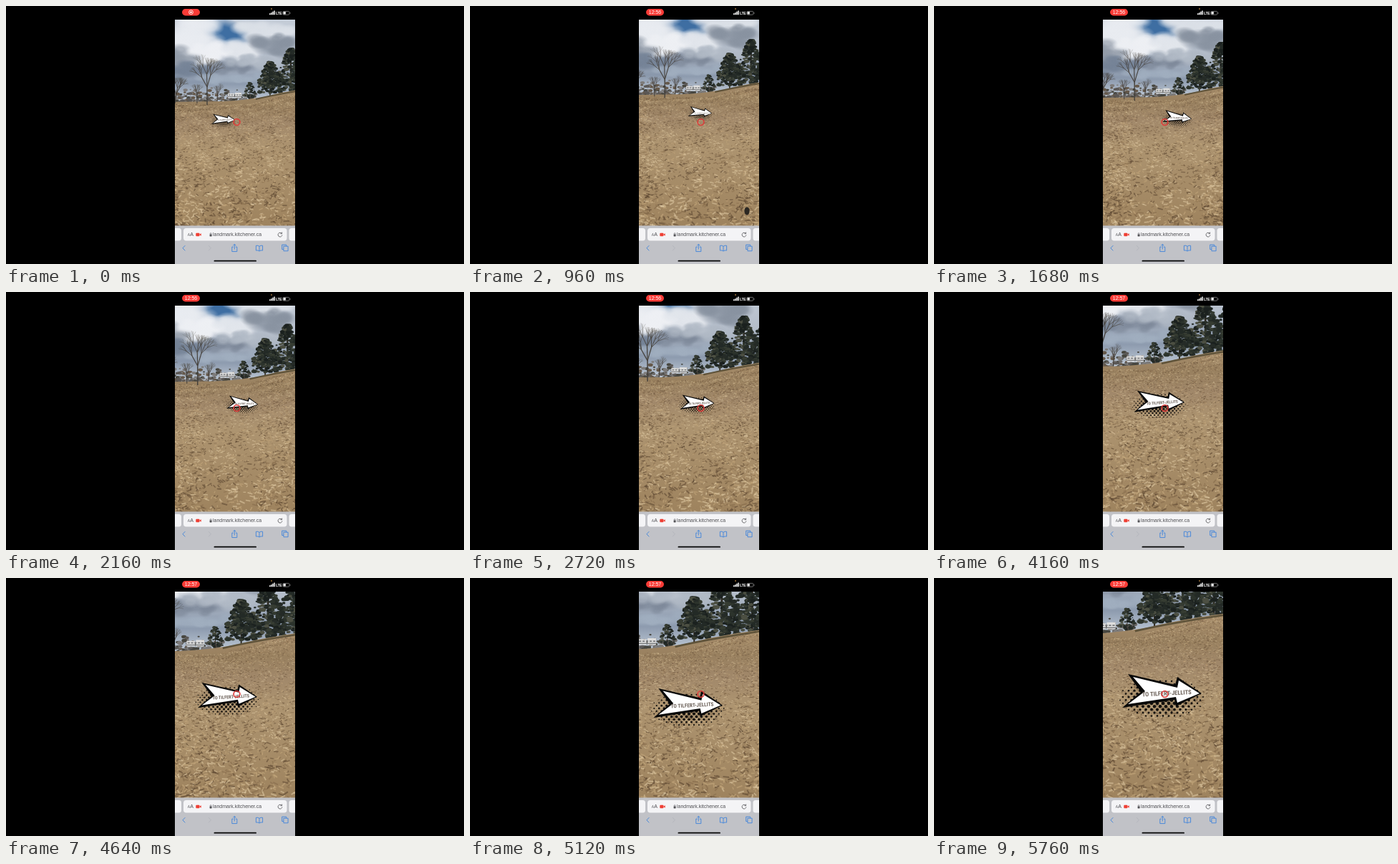
An HTML page with a canvas for the animation above (5.84 s loop, 640 by 360 pixels).

```html
<!DOCTYPE html>
<html lang="en">
<head>
<meta charset="utf-8">
<title>Walking arrow</title>
<style>
html, body { margin: 0; width: 100%; height: 100%; overflow: hidden; background: #000; }
canvas, svg { position: absolute; left: 0; top: 0; width: 640px; height: 360px; display: block; }
text { font-family: "Liberation Sans", Arial, sans-serif; }
#label { font-family: "Liberation Sans Narrow", "Roboto Condensed", "Open Sans Condensed", Lato, sans-serif; font-weight: 700; }
</style>
</head>
<body>
<canvas id="photo" width="640" height="360"></canvas>
<svg viewBox="0 0 640 360">
  <defs><clipPath id="view"><rect x="236" y="19" width="168" height="288"/></clipPath></defs>
  <g clip-path="url(#view)">
    <g id="arrow">
      <g id="dots" fill="#15120f"></g>
      <path d="M-49-24 17-9 20-20 54 3 18 21 16 12-57 23-31 1Z" fill="#080808"/>
      <path d="M-42-20 20-5 22-15 51 3 20 16 18 8-49 18-25 0Z" fill="#fff"/>
      <text id="label" x="5" y="6" text-anchor="middle" fill="#6d625a" transform="rotate(-3)">TO TILFERT-JELLITS</text>
    </g>
    <circle cx="322.5" cy="162" r="4.4" fill="none" stroke="#dc3c3a" stroke-width="1.9" opacity=".9"/>
  </g>

  <!-- status bar -->
  <rect x="246" y="4" width="25" height="9.5" rx="4.7" fill="#fb3b36"/>
  <g id="rec" fill="none" stroke="#fff">
    <circle cx="258.5" cy="8.7" r="2.9" stroke-width=".9"/>
    <circle cx="258.5" cy="8.7" r="1.3" fill="#fff" stroke="none"/>
  </g>
  <text id="clock" x="258.5" y="11.3" font-size="7" text-anchor="middle" fill="#fff"></text>
  <circle cx="371" cy="4" r=".9" fill="#a8793e"/>
  <path d="M368 12.3v-2h1.5v2zM370.1 12.3V9.2h1.5v3.1zM372.2 12.3V7.8h1.5v4.5zM374.3 12.3V6.4h1.5v5.9z" fill="#fff"/>
  <text x="377" y="12.2" font-size="5.2" font-weight="700" fill="#fff" letter-spacing="-.3">LTE</text>
  <rect x="386.9" y="7.4" width="9" height="4.8" rx="1.3" fill="none" stroke="#8c8c8c" stroke-width=".8"/>
  <rect x="387.6" y="8.1" width="3.2" height="3.4" rx=".5" fill="#fff"/>
  <rect x="396.6" y="8.9" width=".8" height="1.9" fill="#8c8c8c"/>

  <!-- browser bar -->
  <rect x="236" y="306.5" width="168" height="53.5" fill="#c1c2c7"/>
  <g fill="#f4f4f6">
    <rect x="248" y="310" width="144.5" height="17.5" rx="3.8"/>
    <path d="M236 310h5.5q3.5 0 3.5 3.5v10.5q0 3.5-3.5 3.5H236z"/>
    <path d="M404 310h-5q-3.5 0-3.5 3.5v10.5q0 3.5 3.5 3.5h5z"/>
  </g>
  <g fill="#505054">
    <text x="253.8" y="321.3" font-size="5">A</text>
    <text x="257.2" y="321.3" font-size="7">A</text>
    <text x="289" y="321.3" font-size="7">landmark.kitchener.ca</text>
    <rect x="284.6" y="318.5" width="3" height="2.9" rx=".4"/>
  </g>
  <path d="M285.2 318.6v-1a.9.9 0 0 1 1.8 0v1" fill="none" stroke="#505054" stroke-width=".6"/>
  <path d="M266.3 316.7h3.2q1 0 1 1v2.600q0 1-1 1h-3.200q-1 0-1-1v-2.600q0-1 1-1zM270.800 318.400l1.900-1.200v3.600l-1.900-1.200z" fill="#ee4035"/>
  <path d="M385.3 317.4a2.9 2.9 0 1 0 .6 2.1M385.6 315.600v2.100h-2.100" fill="none" stroke="#5a5a5e" stroke-width=".85"/>
  <g fill="none" stroke="#3f84dc" stroke-width=".9" stroke-linejoin="round">
    <path d="M250.3 334.2l-3.4 3.6 3.4 3.6"/>
    <path d="M283 334.2l3.4 3.6-3.4 3.6" stroke="#b1b4bb"/>
    <path d="M317.7 336.2h-1.900v6.400h7v-6.400h-1.900M319.300 339.500v-7M317.300 334.300l2-2 2 2"/>
    <path d="M354 335.400q-2-1.800-4.600-1v6.700q2.600-.7 4.600.9 2-1.600 4.600-.9v-6.700q-2.600-.8-4.600 1v6.600"/>
    <path d="M387.900 339.500h-2.200v-6.300h6v2M387.900 335.200h6.200v6.600h-6.200z"/>
  </g>
  <rect x="290.500" y="354.700" width="59.500" height="1.900" rx=".95" fill="#050505"/>
</svg>
<script>
const LOOP = 5840, STEP = 80, TAU = Math.PI * 2;
const $ = id => document.getElementById(id);
const ctx = $('photo').getContext('2d');
const mod = (a, n) => ((a % n) + n) % n;

let seed = 71;
const rnd = () => (seed = (seed * 16807) % 2147483647) / 2147483647;
const span = (a, b) => a + (b - a) * rnd();
const pick = list => list[Math.floor(rnd() * list.length)];

// time, scenery x, y, scale, arrow x, y, scale, turn
const keys = [
  [0, 341, 127, 1, 304, 158, .30, 0],
  [960, 334, 117, 1.03, 322, 148, .30, 3],
  [1680, 342, 121, 1.03, 340.5, 155, .365, 4],
  [2720, 317, 112, 1.15, 318, 154, .435, 0],
  [4160, 308, 96, 1.25, 315.5, 152.5, .64, -1],
  [5120, 276, 92, 1.33, 306, 175, .87, 0],
  [5760, 270, 70, 1.36, 320, 158, 1, 0]
];

const rate = (i, c) => (keys[i + 1][c] - keys[i][c]) / (keys[i + 1][0] - keys[i][0]);
// tangent that never overshoots a key
function slope(i, c) {
  if (i === 0) return rate(0, c);
  if (i === keys.length - 1) return rate(i - 1, c);
  const a = rate(i - 1, c), b = rate(i, c);
  return a * b > 0 ? 2 * a * b / (a + b) : 0;
}
function pose(t) {
  t = Math.min(t, 5760);
  let i = 0;
  while (i < keys.length - 2 && t > keys[i + 1][0]) i++;
  const a = keys[i], b = keys[i + 1], d = b[0] - a[0], u = (t - a[0]) / d;
  const w = u * u * (3 - 2 * u);
  return a.map((v, c) => c ? v + (b[c] - v) * w +
    d * u * (1 - u) * ((1 - u) * slope(i, c) - u * slope(i + 1, c)) : t);
}

function conifer(x, base, w, h, n) {
  const blobs = [];
  for (let i = 0; i < n; i++) {
    const v = rnd(), half = w * (.16 + .84 * Math.sin(Math.min(1, v * 1.25) * Math.PI / 2));
    const side = span(-1, 1);
    blobs.push({ x: x + side * half, y: base - h * (1 - v), r: span(.9, 2.7) * Math.min(1, h / 38),
      tone: pick(['#1b211f', '#232a26', '#2c332c', '#363c32', side < 0 ? '#4c4f42' : '#252b27']) });
  }
  return { x, base, h, blobs };
}
const pines = [
  conifer(89, -14, 20, 58, 330),
  conifer(57, -9, 18, 58, 330),
  conifer(28, -6, 16, 43, 260),
  conifer(0, 1, 8, 21, 110)
];

function branches(x, y, len, ang, depth, out) {
  const x2 = x + Math.cos(ang) * len, y2 = y + Math.sin(ang) * len;
  out.push([x, y, x2, y2, .22 + depth * .28]);
  if (!depth) return out;
  for (const turn of [-.42, .03, .42])
    branches(x2, y2, len * span(.6, .8), ang + turn + span(-.15, .15), depth - 1, out);
  return out;
}
const bare = [
  ...branches(-60, 11, 25, -1.57, 4, []),
  ...branches(-74, 9, 11, -1.57, 3, []),
  ...branches(-46, 6, 9, -1.5, 3, []),
  ...branches(-105, 9, 13, -1.45, 4, [])
];

const brush = Array.from({ length: 320 }, () => ({
  x: span(-150, 8), y: 7 - 20 * rnd() * rnd(), r: span(.8, 2.6),
  tone: pick(['#5b5856', '#6d6a68', '#47463f', '#7d7b7a', '#65584a'])
}));

// patches of the sky: x, y, width, height, colour
const clouds = [
  [-82, -84, 36, 30, '233,236,241'],
  [-98, -52, 32, 14, '146,155,168'],
  [-52, -63, 30, 13, '238,240,244'],
  [-8, -64, 30, 14, '226,230,236'],
  [18, -92, 38, 15, '220,225,232'],
  [30, -72, 32, 15, '136,146,160'],
  [-25, -42, 46, 9, '126,137,154'],
  [-82, -36, 42, 11, '116,130,150'],
  [10, -50, 40, 9, '176,185,197'],
  [-20, -25, 60, 7, '160,174,191']
].map(([x, y, w, h, rgb]) => ({ x, y, w, h, rgb, bits: Array.from({ length: 16 }, () => {
  const a = span(0, TAU), d = Math.sqrt(rnd());
  return { x: x + Math.cos(a) * d * w, y: y + Math.sin(a) * d * h, r: span(.25, .55) * h + 2 };
}) }));

const FAR = 3.4;
const tufts = Array.from({ length: 6000 }, () => {
  const u = span(-95, 95), depth = span(0, FAR), a = span(0, TAU);
  const lit = Math.sin(u * .13 + depth * 7) + Math.sin(u * .05 - depth * 13) + span(-2.4, 2.4);
  const tone = lit > 1.3 ? '#dcc7a0' : lit > 0 ? '#c4a77c' : lit > -1.3 ? '#866b4b' : '#5c4631';
  return { u, depth, tone, dx: Math.cos(a), dy: Math.sin(a) * .65, size: span(.5, 1.1) };
});

function puff(x, y, rx, ry, rgb, alpha, turn = 0) {
  ctx.save();
  ctx.translate(x, y);
  ctx.rotate(turn);
  ctx.scale(rx, ry);
  const g = ctx.createRadialGradient(0, 0, .4, 0, 0, 1);
  g.addColorStop(0, `rgba(${rgb},${alpha})`);
  g.addColorStop(1, `rgba(${rgb},0)`);
  ctx.fillStyle = g;
  ctx.fillRect(-1, -1, 2, 2);
  ctx.restore();
}
function blob(b) {
  ctx.fillStyle = b.tone;
  ctx.beginPath();
  ctx.ellipse(b.x, b.y, b.r * 1.25, b.r * .8, 0, 0, TAU);
  ctx.fill();
}

function sky() {
  const g = ctx.createLinearGradient(0, -110, 0, 5);
  g.addColorStop(0, '#c6ced9');
  g.addColorStop(.5, '#b4bdca');
  g.addColorStop(.78, '#8997ab');
  g.addColorStop(1, '#bcc7d4');
  ctx.fillStyle = g;
  ctx.fillRect(-200, -200, 450, 220);
  puff(-33, -88, 38, 22, '62,110,162', 1, .4);
  for (const c of clouds) {
    puff(c.x, c.y, c.w, c.h, c.rgb, .8);
    for (const b of c.bits) puff(b.x, b.y, b.r * 1.7, b.r, c.rgb, .65);
  }
}

function scenery() {
  brush.forEach(blob);
  ctx.fillStyle = '#dededd';
  ctx.fillRect(-31, -5, 9, 6);
  ctx.fillRect(-21, -6, 9, 7);
  ctx.fillStyle = '#77797c';
  for (let i = 0; i < 5; i++) ctx.fillRect(-30 + i * 3.7, -3.500, 2.400, 1.300);
  ctx.fillRect(-31, -1, 19, 1);
  ctx.lineCap = 'round';
  for (const p of pines) {
    ctx.strokeStyle = '#302a22';
    ctx.lineWidth = p.h / 28;
    ctx.beginPath();
    ctx.moveTo(p.x, p.base + 5);
    ctx.lineTo(p.x, p.base - p.h * .8);
    ctx.stroke();
    p.blobs.forEach(blob);
  }
}

function ridge() {
  ctx.beginPath();
  ctx.moveTo(-200, 8);
  ctx.lineTo(-40, 6);
  ctx.quadraticCurveTo(5, 4, 35, -4);
  ctx.quadraticCurveTo(70, -12, 160, -23);
}

function field(px, py, s, t) {
  const top = py + 9 * s;
  const g = ctx.createLinearGradient(0, py - 20, 0, 307);
  g.addColorStop(0, '#a98f6d');
  g.addColorStop(.15, '#98805f');
  g.addColorStop(.28, '#a1886a');
  g.addColorStop(.45, '#ad9470');
  g.addColorStop(1, '#9e835e');
  ctx.save();
  ctx.translate(px, py);
  ctx.scale(s, s);
  ridge();
  ctx.lineTo(160, 300);
  ctx.lineTo(-200, 300);
  ctx.closePath();
  ctx.restore();
  ctx.fillStyle = g;
  ctx.fill();

  ctx.save();
  ctx.clip();
  ctx.globalAlpha = .6;
  for (const f of tufts) {
    // grass that has passed below the view starts again at the horizon
    const walked = f.depth - t * .00019, depth = mod(walked, FAR);
    const born = walked < 0 ? FAR : f.depth;
    const k = Math.exp(.08 - depth);
    const x = 230 + mod(f.u * Math.exp(born - depth) + px - 246, 180);
    const rise = Math.max(0, x - px) * .28 * (1 - Math.min(1, k)) ** 3;
    const y = top - 8 + 250 * k - rise;
    const len = (1.8 + 8.5 * k) * f.size, flat = Math.min(1, .35 + k);
    ctx.strokeStyle = f.tone;
    ctx.lineWidth = .5 + 1.9 * k * f.size;
    ctx.beginPath();
    ctx.moveTo(x - f.dx * len / 2, y - f.dy * flat * len / 2);
    ctx.lineTo(x + f.dx * len / 2, y + f.dy * flat * len / 2);
    ctx.stroke();
  }
  ctx.restore();
}

function photo(t, px, py, s) {
  ctx.clearRect(0, 0, 640, 360);
  ctx.save();
  ctx.beginPath();
  ctx.rect(236, 19, 168, 288);
  ctx.clip();
  const inScene = draw => {
    ctx.save();
    ctx.translate(px, py);
    ctx.scale(s, s);
    draw();
    ctx.restore();
  };
  inScene(() => { sky(); scenery(); });
  field(px, py, s, t);
  inScene(() => {
    ctx.strokeStyle = 'rgba(74,66,43,.75)';
    ctx.lineWidth = 2;
    ctx.beginPath();
    ctx.moveTo(8, 3);
    ctx.quadraticCurveTo(45, -6, 130, -18);
    ctx.stroke();
    ctx.strokeStyle = '#45403b';
    for (const [x, y, x2, y2, w] of bare) {
      ctx.lineWidth = w;
      ctx.beginPath();
      ctx.moveTo(x, y);
      ctx.lineTo(x2, y2);
      ctx.stroke();
    }
  });
  if (t >= 800 && t <= 1120) {
    const d = t - 960;
    ctx.fillStyle = '#2b2722';
    ctx.beginPath();
    ctx.ellipse(387 + d * .03, 286 + d * .1, 3.6, 5.5, 0, 0, TAU);
    ctx.fill();
  }
  ctx.restore();
}

function makeDots() {
  let out = '';
  for (let row = 0; row < 12; row++)
    for (let x = -60 + (row % 2) * 4; x < 60; x += 8) {
      const y = -14 + row * 4.4;
      const d = ((x + 2) / 59) ** 2 + ((y - 10) / 28) ** 2;
      if (d < 1) out += `<circle cx="${x}" cy="${y.toFixed(1)}" r="${(2.6 * (1 - d * .65)).toFixed(2)}"/>`;
    }
  $('dots').innerHTML = out;
}

function fitLabel() {
  const label = $('label');
  label.setAttribute('font-size', 10);
  label.setAttribute('font-size', Math.min(11, 690 / label.getComputedTextLength()));
}

function render(t) {
  const [, px, py, s, ax, ay, size, turn] = pose(t);
  photo(t, px, py, s);
  $('arrow').setAttribute('transform', `translate(${ax} ${ay}) rotate(${turn}) scale(${size})`);
  const timed = t >= 480;
  $('rec').style.display = timed ? 'none' : '';
  $('clock').textContent = !timed ? '' : t < 3440 ? '12:56' : '12:57';
}

makeDots();
fitLabel();
render(0);
let start, last = 0;
function tick(now) {
  start ??= now;
  const t = Math.floor(mod(now - start, LOOP) / STEP) * STEP;
  if (t !== last) render(last = t);
  requestAnimationFrame(tick);
}
requestAnimationFrame(tick);
</script>
</body>
</html>
```
